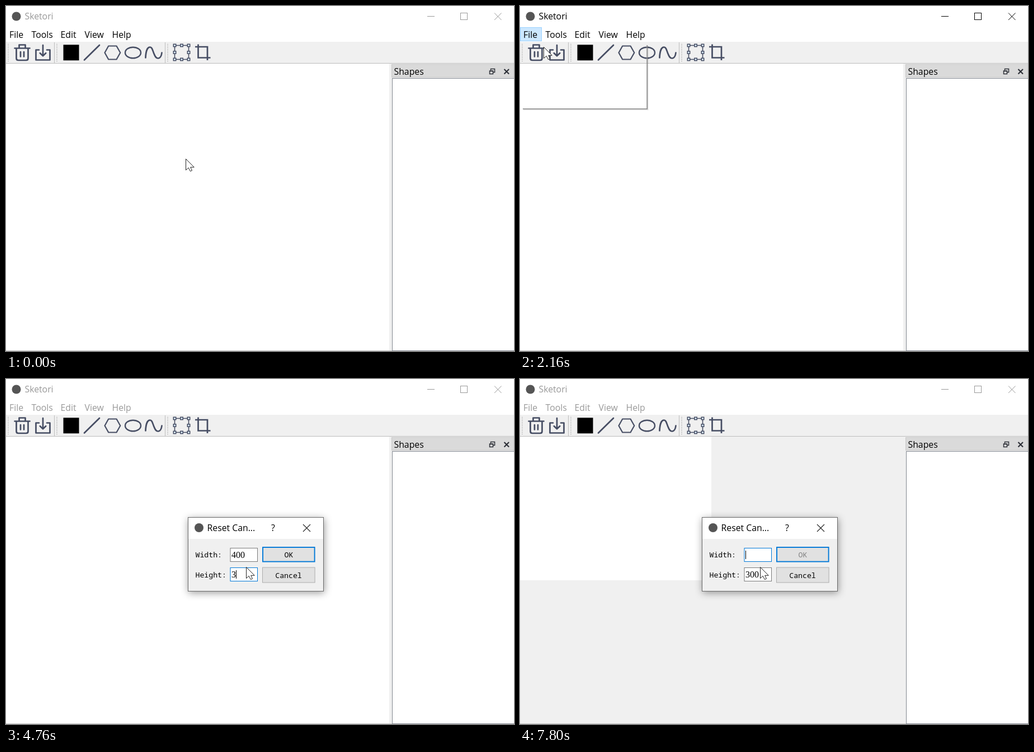
An HTML page for the animation above (8 s loop, 908x617 px).

```html
<!DOCTYPE html>
<html lang="en">
<head>
<meta charset="utf-8">
<title>Sketori</title>
<style>
  html, body { margin: 0; width: 100%; height: 100%; overflow: hidden; background: #fff; }
  svg { display: block; width: 100%; height: 100%; }
  text { font: 15.8px "Open Sans", "Noto Sans", sans-serif; white-space: pre; }
  .mono { font: 300 13.2px "Noto Sans Mono", "Liberation Mono", monospace; }
  .digits { font: 16px "Liberation Serif", serif; }
  .icon { fill: none; stroke: #464d63; stroke-width: 2.7; stroke-linecap: round; stroke-linejoin: round; }
  .crisp { shape-rendering: crispEdges; }
  .mid { text-anchor: middle; }
</style>
</head>
<body>
<svg viewBox="0 0 908 617">
  <defs>
    <filter id="soft" x="-20%" y="-20%" width="140%" height="150%">
      <feDropShadow dx="1" dy="3" stdDeviation="7" flood-color="#000" flood-opacity=".4"/>
    </filter>
  </defs>

  <rect width="908" height="617" fill="#fff"/>

  <!-- title bar -->
  <circle cx="18.5" cy="18.5" r="8" fill="#555"/>
  <text id="name" x="33.5" y="24">Sketori</text>
  <g id="controls" fill="none">
    <path class="crisp" d="M753 18.5h13M812.5 12.5h12v12h-12z"/>
    <path d="M873 12.5l12.5 12.5M885.5 12.5L873 25"/>
  </g>

  <!-- menu bar -->
  <rect id="hover" class="crisp" x=".5" y="38.5" width="38" height="24" fill="#cce8ff" stroke="#99d1ff"/>
  <g id="bar">
    <text x="6" y="56.5">File</text>
    <text x="45.5" y="56.5">Tools</text>
    <text x="97.5" y="56.5">Edit</text>
    <text x="140.5" y="56.5">View</text>
    <text x="189.5" y="56.5">Help</text>
  </g>

  <!-- toolbar -->
  <g class="crisp">
    <rect y="64" width="908" height="39" fill="#f0f0f0"/>
    <path d="M0 102.5H908M86.5 65V102M284.5 65V102" stroke="#bdbdbd"/>
    <path d="M4 68V101M91 68V101M289 68V101" stroke="#b4b4b4" stroke-width="2" stroke-dasharray="1 2"/>
  </g>
  <rect x="102.5" y="69.3" width="28" height="28"/>
  <g class="icon">
    <path d="M15.5 75.5H42.5M23.5 75V69.5H34.5V75M18.5 76V93.5Q18.5 97 22 97H36Q39.5 97 39.5 93.5V76M26 82V90.5M32 82V90.5"/>
    <path d="M59 78.5H53.5V96.5H78.5V78.5H73M66 70V89M60.8 84.2L66 89.4L71.2 84.2"/>
    <path d="M140 96.5L167 70"/>
    <path d="M176.5 83.5L183.2 71.5H197.5L204.3 83.5L197.5 95.5H183.2Z" stroke-width="2.2"/>
    <ellipse cx="227" cy="83.5" rx="14" ry="9.8" stroke-width="2.4"/>
    <path d="M249.5 92.5C250 78 254 73.5 257.5 73.5S262 79 264 84S267.5 93.5 271.5 93.5S278 89 278.5 83.5"/>
    <path d="M343.5 68.5V92.5H365.5M338 73H360V97" stroke-linecap="butt" stroke-linejoin="miter"/>
    <path d="M301.5 70.5H326.5V95.5H301.5Z" stroke-width="1.6"/>
    <g id="grips" fill="#d5e6f5" stroke-width="1.5" stroke-linejoin="miter"></g>
  </g>

  <!-- work area -->
  <g class="crisp">
    <rect y="103" width="908" height="514" fill="#f0f0f0"/>
    <rect id="canvas" y="103" fill="#fff"/>
    <rect x="689.5" y="104.5" width="220" height="23" fill="#dadada" stroke="#c8c8c8"/>
    <rect x="690.5" y="129.5" width="220" height="487" fill="#fff" stroke="#828790"/>
    <path d="M0 616.5H690" stroke="#c4c4c4"/>
  </g>
  <text x="693.5" y="122.5">Shapes</text>
  <path d="M866.5 115V112.5H873.5V118.5H871M864.5 116H870.5V121.5H864.5ZM864 116.5H871" fill="none" stroke="#2e3138" stroke-width="1.5"/>
  <path d="M890.5 113L899 121.5M899 113L890.5 121.5" stroke="#2e3138" stroke-width="2.2"/>

  <!-- drop-down -->
  <g id="shade" fill="none">
    <path d="M5 184H227.2V70" stroke="#888" stroke-width="1.6"/>
    <path d="M6 185.5H228.7V71" stroke="#000" stroke-opacity=".14" stroke-width="1.5"/>
  </g>
  <g id="menu">
    <rect class="crisp" x=".5" y="63.5" width="225" height="119" fill="#f2f2f2" stroke="#a8a8a8"/>
    <rect id="row" x="3" y="66" width="220" height="37" fill="#90c8f6"/>
    <text x="38" y="90">Reset Canvas</text>
    <text x="38" y="128">Save Canvas</text>
    <text x="38" y="166">Exit</text>
  </g>

  <!-- dialog -->
  <g id="dialog">
    <rect x="325" y="247" width="243" height="132.5" fill="#f0f0f0" filter="url(#soft)"/>
    <rect class="crisp" x="325" y="247" width="243" height="39" fill="#fff"/>
    <rect class="crisp" x="325.5" y="247.5" width="242" height="132" fill="none" stroke="#686868"/>
    <circle cx="345" cy="266" r="8" fill="#555"/>
    <text x="359.5" y="272">Reset Can...</text>
    <text class="mid" x="477.5" y="272">?</text>
    <path d="M531 260L544 273M544 260L531 273" stroke="#222" stroke-width="1.1"/>
    <text class="mono" x="338.5" y="319">Width:</text>
    <text class="mono" x="338.5" y="355">Height:</text>
    <rect x="459" y="301" width="92.6" height="25.6" fill="#e1e1e1" stroke="#0078d7" stroke-width="1.9"/>
    <rect x="458.5" y="337" width="93.6" height="27" fill="#e1e1e1" stroke="#adadad"/>
    <text id="ok" class="mono mid" x="505.5" y="318.5">OK</text>
    <text class="mono mid" x="505" y="355.5">Cancel</text>
    <g id="fields"></g>
  </g>

  <path id="pointer" d="M.5 .5V20.5L5.2 16.3L8.4 22.6L11.5 21.2L8.7 15.3H15.2Z" fill="#fff" stroke="#222"/>
</svg>
<script>
const LOOP = 8000;
const $ = id => document.getElementById(id);
const clamp = v => Math.max(0, Math.min(1, v));
const within = (t, a, b) => t >= a && t < b;
const show = (id, on) => $(id).setAttribute('visibility', on ? 'visible' : 'hidden');

function add(parent, tag, attrs) {
  const el = document.createElementNS('http://www.w3.org/2000/svg', tag);
  for (const k in attrs) el.setAttribute(k, attrs[k]);
  return parent.appendChild(el);
}

for (const x of [301.5, 314, 326.5])
  for (const y of [70.5, 83, 95.5])
    if (x !== 314 || y !== 83) add($('grips'), 'rect', { x: x - 2.2, y: y - 2.2, width: 4.4, height: 4.4 });

const fields = [302.5, 337.5].map(y => {
  const g = $('fields');
  return {
    box: add(g, 'rect', { x: 401, y, width: 48.5, height: 24, fill: '#fff' }),
    mark: add(g, 'rect', { class: 'crisp', x: 403, y: y + 4.5, width: 25, height: 16, fill: '#0078d7' }),
    text: add(g, 'text', { class: 'digits', x: 403, y: y + 17 }),
    caret: add(g, 'rect', { class: 'crisp', y: y + 4.5, width: 1, height: 15, fill: '#000' })
  };
});

// pointer path: time, x, y
const path = [
  [100, 321, 273], [180, 311, 261], [500, 176, 112], [740, 72, 27], [820, 48, 15],
  [900, 37, 18], [980, 34, 24], [1130, 24, 37], [1290, 23, 42], [1440, 23, 42],
  [1600, 27, 50], [1840, 42, 73], [2160, 42, 73], [2320, 120, 126], [2560, 345, 280],
  [2720, 420, 331], [2800, 429, 336], [8000, 429, 336]
];

// typing: time, width, height, focused field, caret mode
const typing = [
  [0, '800', '600', 0, ''], [3100, '80', '600', 0, 'on'], [3360, '8', '600', 0, 'on'],
  [3480, '', '600', 0, 'on'], [3720, '4', '600', 0, 'on'], [3870, '40', '600', 0, 'on'],
  [4050, '400', '600', 0, 'on'], [4270, '400', '600', 1, 'all'], [4760, '400', '3', 1, 'on'],
  [4920, '400', '30', 1, 'on'], [5070, '400', '300', 1, 'on'], [6650, '400', '300', 0, 'on'],
  [7180, '400', '300', 0, ''], [7490, '40', '300', 0, 'on'], [7640, '4', '300', 0, 'on'],
  [7800, '', '300', 0, 'on']
];

function sample(t) {
  const shift = t < 1130 ? 20 : t < 1440 ? 10 : 0;
  return Math.max(0, Math.floor((t - shift) / 80) * 80 + shift);
}

function movePointer(t) {
  const s = sample(t);
  const i = path.findIndex(p => p[0] > s);
  const a = path[Math.max(0, i - 1)], b = path[i];
  const k = clamp((s - a[0]) / (b[0] - a[0] || 1));
  const at = n => Math.round(a[n] + (b[n] - a[n]) * k);
  $('pointer').setAttribute('transform', `translate(${at(1)} ${at(2)})`);
}

function dialogLevel(t) {
  if (t < 5400) return clamp((t - 2240) / 240);
  if (t < 6650) return clamp(1 - (t - 5330) / 200);
  return clamp((t - 6580) / 230);
}

function updateDialog(t) {
  const level = dialogLevel(t), scale = 0.92 + 0.08 * Math.sqrt(level);
  $('dialog').setAttribute('opacity', level);
  $('dialog').setAttribute('transform',
    `translate(446.5 313.5) scale(${scale}) translate(-446.5 -313.5)`);

  const state = typing.filter(s => s[0] <= t).pop();
  fields.forEach((f, i) => {
    const value = state[i + 1], active = state[3] === i;
    const all = active && state[4] === 'all', caret = active && state[4] === 'on';
    f.box.setAttribute('stroke', active ? '#0078d7' : '#7a7a7a');
    f.mark.setAttribute('opacity', all ? 1 : 0);
    f.text.textContent = value;
    f.text.setAttribute('fill', all ? '#fff' : '#000');
    f.caret.setAttribute('x', 403 + 8 * value.length);
    f.caret.setAttribute('opacity', caret ? 1 : 0);
  });
  $('ok').setAttribute('fill', state[1] && state[2] ? '#000' : '#838383');
}

function render(t) {
  const modal = within(t, 2320, 5400) || t >= 6650;
  const idle = modal || t < 1440;
  $('name').setAttribute('fill', idle ? '#999' : '#000');
  $('controls').setAttribute('stroke', idle ? '#999' : '#000');
  $('bar').setAttribute('fill', modal ? '#999' : '#000');
  show('hover', within(t, 1210, 2240));

  show('shade', within(t, 1520, 2240));
  show('menu', within(t, 1440, 2160));
  $('menu').setAttribute('opacity', clamp((t - 1360) / 200));
  $('row').setAttribute('opacity', t >= 1760 ? 1 : 0);

  const small = t >= 5400;
  $('canvas').setAttribute('width', small ? 342 : 685);
  $('canvas').setAttribute('height', small ? 257 : 513);

  updateDialog(t);
  movePointer(t);
}

const start = performance.now();
function tick() {
  render((performance.now() - start) % LOOP);
  requestAnimationFrame(tick);
}
tick();
</script>
</body>
</html>
```
